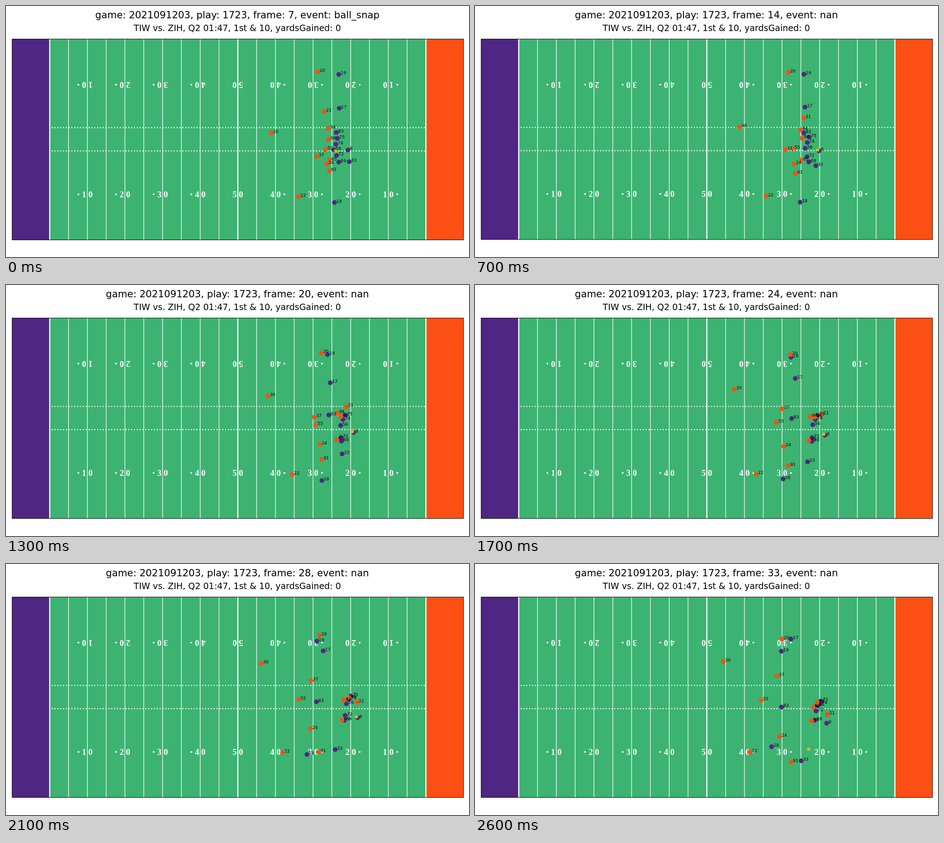
These frames come from a looping animation (1017 px wide and 551 px high, 2700 ms). An HTML page:

```html
<!DOCTYPE html>
<html lang="en">
<head>
<meta charset="utf-8">
<title>Play tracking</title>
<style>
  html, body { margin: 0; width: 100%; height: 100%; overflow: hidden; background: #fff; }
  svg { display: block; width: 100%; height: 100%; font-family: "DejaVu Sans", sans-serif; }
  .yards { font: bold 18.6px "Liberation Serif", serif; fill: #fff; text-anchor: middle; }
  .labels { font-size: 9.2px; }
</style>
</head>
<body>
<svg id="stage" viewBox="0 0 1017 551"></svg>
<script>
const PURPLE = '#4f2683', ORANGE = '#fb4f14', GREEN = '#3cb371', GOLD = '#dfb90f';
const LEFT = 13.4, TOP = 72.5, WIDTH = 991.6, HEIGHT = 440, YARD = WIDTH / 120;
const STEP = 100, STEPS = 27, FIRST = 7;
const CAUGHT = 7, THROWN = 21, LAST = STEPS - 1;
const EVENTS = { 0: 'ball_snap', 22: 'pass_forward' };

const stage = document.getElementById('stage');

function add(parent, tag, attrs, text) {
  const node = document.createElementNS('http://www.w3.org/2000/svg', tag);
  for (const key in attrs) node.setAttribute(key, attrs[key]);
  if (text !== undefined) node.textContent = text;
  return parent.appendChild(node);
}

// Headings
const title = add(stage, 'text', { x: 508.3, y: 27, 'font-size': 21.2, 'text-anchor': 'middle' });
add(stage, 'text', { x: 508.2, y: 55, 'font-size': 18.93, 'text-anchor': 'middle' },
  'TIW vs. ZIH, Q2 01:47, 1st & 10, yardsGained: 0');

// Field
const field = add(stage, 'g', {});
const yardX = yard => LEFT + yard * YARD;
const zone = (yard, length, fill) => add(field, 'rect',
  { x: yardX(yard), y: TOP, width: length * YARD, height: HEIGHT, fill });
zone(0, 120, GREEN);
zone(0, 10, PURPLE);
zone(110, 10, ORANGE);
for (let yard = 10; yard <= 110; yard += 5) {
  add(field, 'line', { x1: yardX(yard), x2: yardX(yard), y1: TOP, y2: TOP + HEIGHT,
    stroke: '#fff', 'stroke-width': yard % 50 === 10 ? 2.5 : 1.3 });
}
for (const y of [266.6, 317.5]) {
  add(field, 'line', { x1: yardX(10), x2: yardX(110), y1: y, y2: y, stroke: '#fff',
    'stroke-width': 2.35, 'stroke-dasharray': '2.35 3.895', 'stroke-dashoffset': 2.3 });
}
add(field, 'rect', { x: LEFT, y: TOP, width: WIDTH, height: HEIGHT, fill: 'none', stroke: '#000' });

const yards = add(field, 'g', { class: 'yards' });
for (let yard = 20; yard <= 100; yard += 10) {
  const x = yardX(yard), side = Math.sign(yard - 60);
  const mark = (50 - Math.abs(yard - 60)) / 10 + ' 0';
  for (const [y, turn] of [[173, 180], [413, 0]]) {
    add(yards, 'text', { y: 6.2, transform: `translate(${x} ${y}) rotate(${turn})` }, mark);
    if (side) {
      add(yards, 'path', { d: 'M18 -2.4L23 0L18 2.4Z',
        transform: `translate(${x} ${y - 0.4}) scale(${side} 1)` });
    }
  }
}

// Players run from a standing start through a waypoint to the end of the play.
const dots = add(field, 'g', {}), labels = add(field, 'g', { class: 'labels' });
const WAYPOINT = 17 / LAST;
const players = [];

// A higher ramp means a slower reaction to the snap.
function run(from, via, to, ramp, u) {
  const total = to - from;
  const bend = (total - (via - from) / WAYPOINT ** ramp) / (1 - WAYPOINT);
  return from + u ** ramp * (total - bend * (1 - u));
}

function player(color, number, from, via, to, ramp = 2) {
  const dot = add(dots, 'circle', { r: 5.2, fill: color });
  const label = add(labels, 'text', {}, number);
  const at = step => [0, 1].map(axis => run(from[axis], via[axis], to[axis], ramp, step / LAST));
  const one = { dot, label, at };
  players.push(one);
  return one;
}
const away = (...args) => player(PURPLE, ...args);
const home = (...args) => player(ORANGE, ...args);

away(19, [731, 150], [694, 158.5], [673, 191.5]);
away(17, [732, 224], [703.5, 205], [694, 164.5]);
away(83, [725.5, 277], [695.5, 293], [673, 314], 3);
away(75, [728, 290], [752, 286], [759.5, 301]);
away(74, [724.5, 303], [747.5, 294.5], [757.5, 307]);
away(56, [720, 315], [742, 306.5], [751, 311]);
away(72, [726, 327.5], [740.5, 335], [749, 322.5]);
away(69, [731, 342], [740, 343], [746, 343]);
away(33, [754, 341], [730.5, 388], [716.5, 432]);
away(18, [721.5, 430.5], [676.7, 425.5], [651.5, 401], 2.5);
const passer = away(8, [751, 315.5], [768.5, 329.5], [772.5, 349.5]);

home(20, [684.5, 144.5], [692.5, 152.5], [674.3, 164.5]);
home(21, [699, 231.5], [761, 284], [774, 330], 1.5);
home(94, [707.5, 268], [736, 289], [742.5, 314.5]);
home(96, [708.5, 292], [746.5, 289.5], [752, 304]);
home(55, [702, 314.5], [662, 301.5], [628.5, 299], 3);
home(24, [704, 346.5], [678, 354], [669, 378.5], 3);
home(91, [710, 361], [688.3, 396.8], [694, 435]);
home(65, [710.5, 338], [733.3, 341], [739.5, 344.3]);
home(37, [682.5, 329.5], [674, 271.5], [663.5, 245.5]);
home(22, [642.5, 417.5], [617.5, 414.8], [604, 413], 3);
home(30, [582, 278], [569.5, 228.7], [545, 214]);

// The ball is snapped to the passer, held, then thrown.
const ball = add(dots, 'circle', { r: 3.6, fill: GOLD });
const mix = (a, b, u) => a.map((value, axis) => value + (b[axis] - value) * u);

function held(step) {
  const [x, y] = passer.at(step);
  return [x - 2.5, y - 2];
}

function ballAt(step) {
  if (step < CAUGHT) return mix([724.5, 317.7], held(CAUGHT), 1 - (1 - step / CAUGHT) ** 1.5);
  if (step <= THROWN) return held(step);
  return mix(held(THROWN), [733, 406.5], (step - THROWN) / (LAST - THROWN));
}

function place(node, attrs) {
  for (const key in attrs) node.setAttribute(key, attrs[key].toFixed(2));
}

function draw(ms) {
  const step = Math.floor(ms / STEP) % STEPS;
  const event = EVENTS[step] || 'nan';
  title.textContent = `game: 2021091203, play: 1723, frame: ${FIRST + step}, event: ${event}`;

  // An underscore in the heading makes the field one pixel taller.
  const stretch = event.includes('_') ? (HEIGHT + 1) / HEIGHT : 1;
  field.setAttribute('transform', `translate(0 ${TOP}) scale(1 ${stretch}) translate(0 ${-TOP})`);

  for (const { dot, label, at } of players) {
    const [x, y] = at(step);
    place(dot, { cx: x, cy: y });
    place(label, { x: x + 4.3, y: y + 0.3 });
  }
  const [cx, cy] = ballAt(step);
  place(ball, { cx, cy });
}

const start = performance.now();
function tick() {
  draw(performance.now() - start);
  requestAnimationFrame(tick);
}
tick();
</script>
</body>
</html>
```
